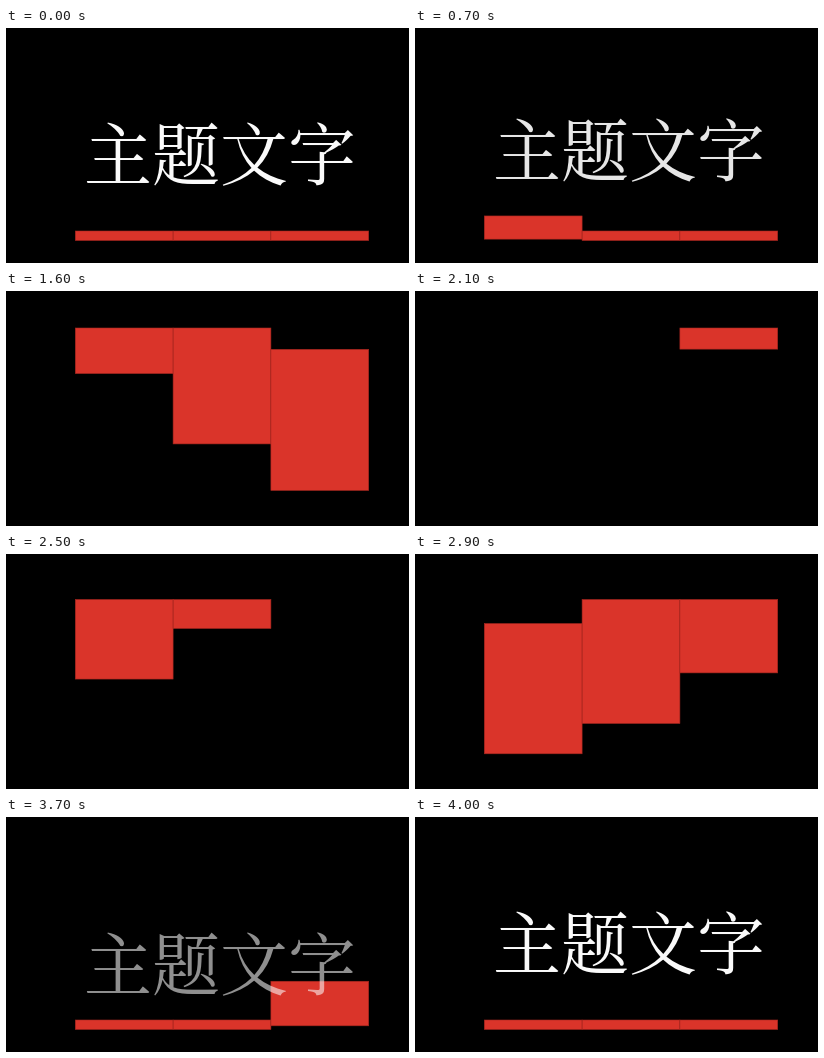
These frames come from a looping animation (403x235 px, 4.2 s). An HTML page:

```html
<!DOCTYPE html>
<html lang="zh">
<head>
<meta charset="utf-8">
<title>主题文字</title>
<style>
  html, body { margin: 0; width: 100%; height: 100%; overflow: hidden; background: #000; }
  svg { display: block; width: 403px; height: 235px; }
  rect { fill: #da342a; stroke: #a3261e; stroke-width: .6; }
  text { font: 400 68px "Noto Serif CJK SC", "Noto Sans CJK SC", "Noto Sans CJK", serif; fill: #fafafa; }
</style>
</head>
<body>
<svg viewBox="0 0 403 235">
  <rect x="69.3" width="97.8"/>
  <rect x="167.1" width="97.8"/>
  <rect x="264.9" width="97.8"/>
  <text x="78" y="152">主题文字</text>
</svg>
<script>
  const LOOP = 4200, STEP = 100, STAGGER = 213;
  const FLOOR = 203, THICK = 9.5, SAG = 15;
  const HIGH = 37, LOW = 45.5, DRIFT = 50;

  const bars = document.querySelectorAll("rect");
  const title = document.querySelector("text");

  const ramp = (t, start, length) => Math.min(1, Math.max(0, (t - start) / length));
  const mix = (a, b, p) => a + (b - a) * p;

  // Stretch up from the floor, then fold into the top edge
  function rise(t) {
    const lift = ramp(t, 645, 607), fold = ramp(t, 1252, 486);
    const bottom = FLOOR + THICK - SAG * lift;
    return [mix(FLOOR, HIGH, lift), mix(bottom, HIGH, fold)];
  }

  // Unfold from the top edge, then shrink onto the floor
  function fall(t) {
    const unfold = ramp(t, 2165, 640), drop = ramp(t, 2805, 622);
    const bottom = FLOOR + THICK - SAG * (1 - drop);
    return [mix(LOW, FLOOR, drop), mix(LOW, bottom, unfold)];
  }

  function draw(now) {
    const t = Math.floor((now % LOOP) / STEP) * STEP;
    bars.forEach((bar, i) => {
      const local = t - i * STAGGER;
      const [top, bottom] = local < 2000 ? rise(local) : fall(local);
      bar.setAttribute("y", top);
      bar.setAttribute("height", bottom - top);
    });

    const leave = ramp(t, 645, 700), enter = ramp(t, 3300, 700);
    const shift = t < 2000 ? -leave : 1 - enter;
    title.setAttribute("transform", `translate(0 ${DRIFT * shift})`);
    title.setAttribute("opacity", 1 - Math.abs(shift));
  }

  const start = performance.now();
  function tick() {
    draw(performance.now() - start);
    requestAnimationFrame(tick);
  }
  tick();
</script>
</body>
</html>
```
